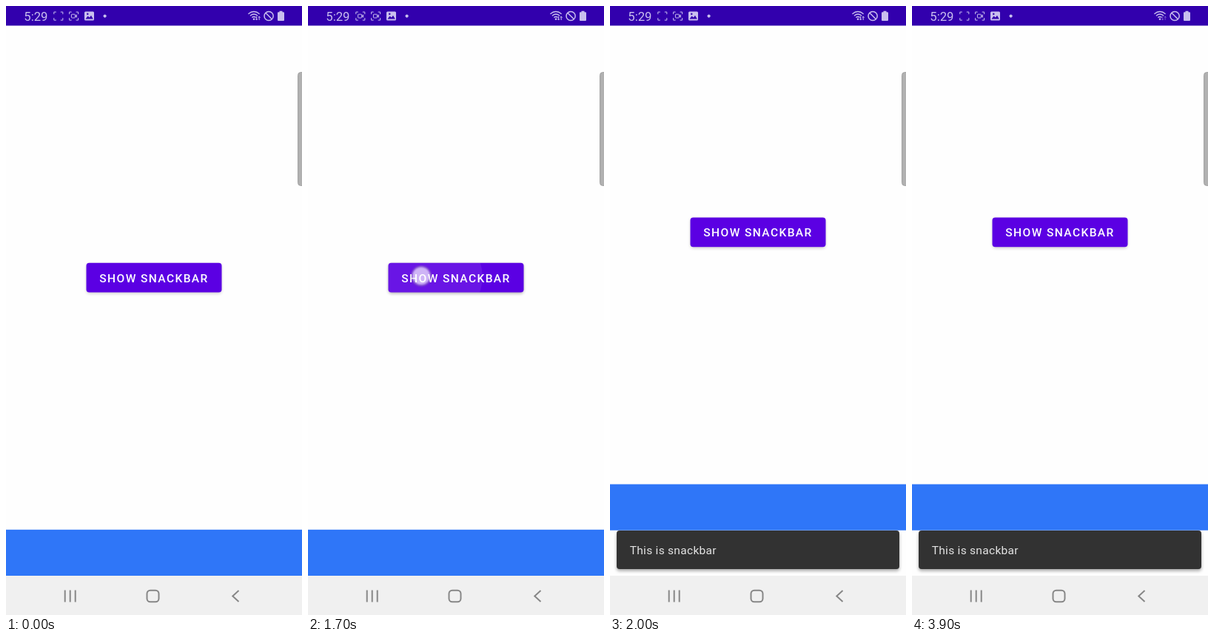
Animation of 400x822 px, one loop 4 s. Source, as an HTML page:

```html
<!DOCTYPE html>
<html lang="en">
<head>
<meta charset="utf-8">
<title>Snackbar demo</title>
<style>
  html, body { margin: 0; width: 100%; height: 100%; overflow: hidden; background: #fefefe; }
  svg { display: block; width: 100%; height: 100%; }
  text { font-family: Roboto, sans-serif; font-size: 15.56px; }
  .line { fill: none; stroke: #c9bfee; }
  .solid { fill: #c9bfee; }
  .nav { fill: none; stroke: #878787; stroke-width: 2; }
</style>
</head>
<body>
<svg viewBox="0 0 400 822">
  <defs>
    <clipPath id="face"><rect x="108.5" y="346.7" width="183" height="39.8" rx="4"/></clipPath>
    <filter id="soft" x="-20%" y="-30%" width="140%" height="180%"><feGaussianBlur stdDeviation="2"/></filter>
    <filter id="glow" x="-30%" y="-30%" width="160%" height="160%"><feGaussianBlur stdDeviation="0.9"/></filter>
    <path id="corners" d="M0 3.5V.5H3M9 .5H12V3.5M12 8.5V11.5H9M3 11.5H0V8.5"/>
    <g id="camera">
      <rect x="2.8" y="3.6" width="5" height="4.8" rx=".8"/>
      <path d="M8 5.8L9.8 4.4V7.6L8 6.2"/>
    </g>
  </defs>

  <rect width="400" height="822" fill="#fefefe"/>

  <!-- Button and blue bar, pushed up by the snackbar -->
  <g id="content">
    <rect x="109" y="348.5" width="182" height="39.5" rx="4" opacity=".2" filter="url(#soft)" id="lift"/>
    <rect x="108.5" y="346.7" width="183" height="39.8" rx="4" fill="#5b00e3"/>
    <g clip-path="url(#face)"><circle id="ripple" fill="#fff"/></g>
    <text x="126.3" y="372.8" fill="#fff" font-weight="500" letter-spacing="1.39">SHOW SNACKBAR</text>
    <rect y="706.8" width="400" height="62.2" fill="#2f76f8"/>
  </g>

  <g id="snack">
    <rect x="9" y="710.5" width="382" height="52" rx="4" opacity=".35" filter="url(#soft)"/>
    <rect x="9" y="708" width="382" height="52" rx="4" fill="#323232"/>
    <text x="26.7" y="739.7" fill="#e4e4e4" letter-spacing=".277">This is snackbar</text>
  </g>

  <g id="touch">
    <circle cx="153" cy="364.3" r="12.8" fill="none" stroke="#999" stroke-opacity=".5" stroke-width="1.6" filter="url(#glow)"/>
    <circle cx="153" cy="364.3" r="12" fill="#fff" opacity=".68" filter="url(#glow)"/>
  </g>

  <!-- Edge handle -->
  <rect x="394.5" y="89.5" width="12" height="153" rx="4" fill="#b1b1b1" stroke="#a3a3a3"/>

  <!-- Status bar -->
  <rect width="400" height="26.5" fill="#3200ad"/>
  <text x="24.3" y="19.6" class="solid" style="font-size:16.7px">5:29</text>
  <g class="line">
    <g transform="translate(64.8 7.6)"><use href="#corners"/><use href="#camera" id="rec"/></g>
    <g transform="translate(85.6 7.6)"><use href="#corners"/><use href="#camera"/></g>
  </g>
  <rect x="106" y="7.5" width="13" height="12" rx="1.5" class="solid"/>
  <path d="M107.5 17.5L110.6 13.4L112.8 15.6L115 12.8L117.8 17.5Z" fill="#3200ad"/>
  <circle cx="110.3" cy="10.8" r="1.2" fill="#3200ad"/>
  <circle cx="133.6" cy="13.6" r="2.1" class="solid"/>
  <g class="line" stroke-width="1.3">
    <path d="M327.4 10.8Q335 4.2 342.6 10.8M329.9 13.2Q335 8.8 340.1 13.2M332.3 15.6Q335 13.3 337.6 15.6"/>
    <path id="arrows" stroke-width="1" d="M338.6 14V19M337.2 17.4L338.6 19L340 17.4M342.2 19V14M340.8 15.6L342.2 14L343.6 15.6"/>
    <path stroke-width="1.5" d="M350.6 9L359.6 18"/>
    <circle cx="355.1" cy="13.5" r="6.1" stroke-width="1.5"/>
  </g>
  <circle cx="335" cy="17.7" r="1.3" class="solid"/>
  <path d="M369.5 8.3V6.8H373.5V8.3H375Q376 8.3 376 9.3V19Q376 20 375 20H368Q367 20 367 19V9.3Q367 8.3 368 8.3Z" class="solid"/>

  <!-- Navigation bar -->
  <rect y="769" width="400" height="53" fill="#f0f0f0"/>
  <path class="nav" d="M79.7 788.5V804.5M86.7 788.5V804.5M93.7 788.5V804.5"/>
  <rect class="nav" x="190.5" y="788.7" width="16" height="15.6" rx="4.5"/>
  <path class="nav" d="M314.5 789L306.3 796.5L314.5 804"/>
</svg>

<script>
const LOOP = 4000, STEP = 100;
const PRESS = 1613, OPEN = 1778, REST_Y = 734;
const $ = id => document.getElementById(id);
const clamp = v => Math.max(0, Math.min(1, v));
const mix = (a, b, p) => a + (b - a) * p;
const easeOut = p => 1 - (1 - p) ** 2.6;
const set = (id, attrs) => {
  for (const k in attrs) $(id).setAttribute(k, attrs[k]);
};

function draw(t) {
  // Snackbar scales and fades in; the content rides on its top edge
  const open = clamp((t - OPEN) / 150);
  const scale = mix(0.8, 1, easeOut(open));
  const shift = t < OPEN ? 0 : mix(-56, -61.3, easeOut(open));
  set('snack', {
    opacity: open,
    transform: `translate(200 ${REST_Y}) scale(${scale}) translate(-200 ${-REST_Y})`
  });
  set('content', { transform: `translate(0 ${shift})` });

  // Ripple drifts from the finger to the button centre
  const press = clamp((t - PRESS) / 215);
  const grow = press * press * (3 - 2 * press);
  const fade = 1 - clamp((t - 1800) / 190);
  set('ripple', {
    cx: mix(153, 200, grow),
    cy: mix(364.3, 366.6, grow),
    r: mix(50, 94, grow),
    opacity: 0.17 * press ** 0.8 * fade
  });
  const pressed = t >= 1600 && t < 1900;
  set('lift', { opacity: pressed ? 0.32 : 0.2 });
  set('touch', { opacity: pressed ? 1 : 0 });

  // Status icons
  set('rec', { opacity: (t + 600) % 1000 < 500 ? 1 : 0 });
  set('arrows', { opacity: t < 2700 ? 1 : 0.4 });
}

const start = performance.now();
function tick() {
  const t = (performance.now() - start) % LOOP;
  draw(Math.floor(t / STEP) * STEP);
  requestAnimationFrame(tick);
}
tick();
</script>
</body>
</html>
```
